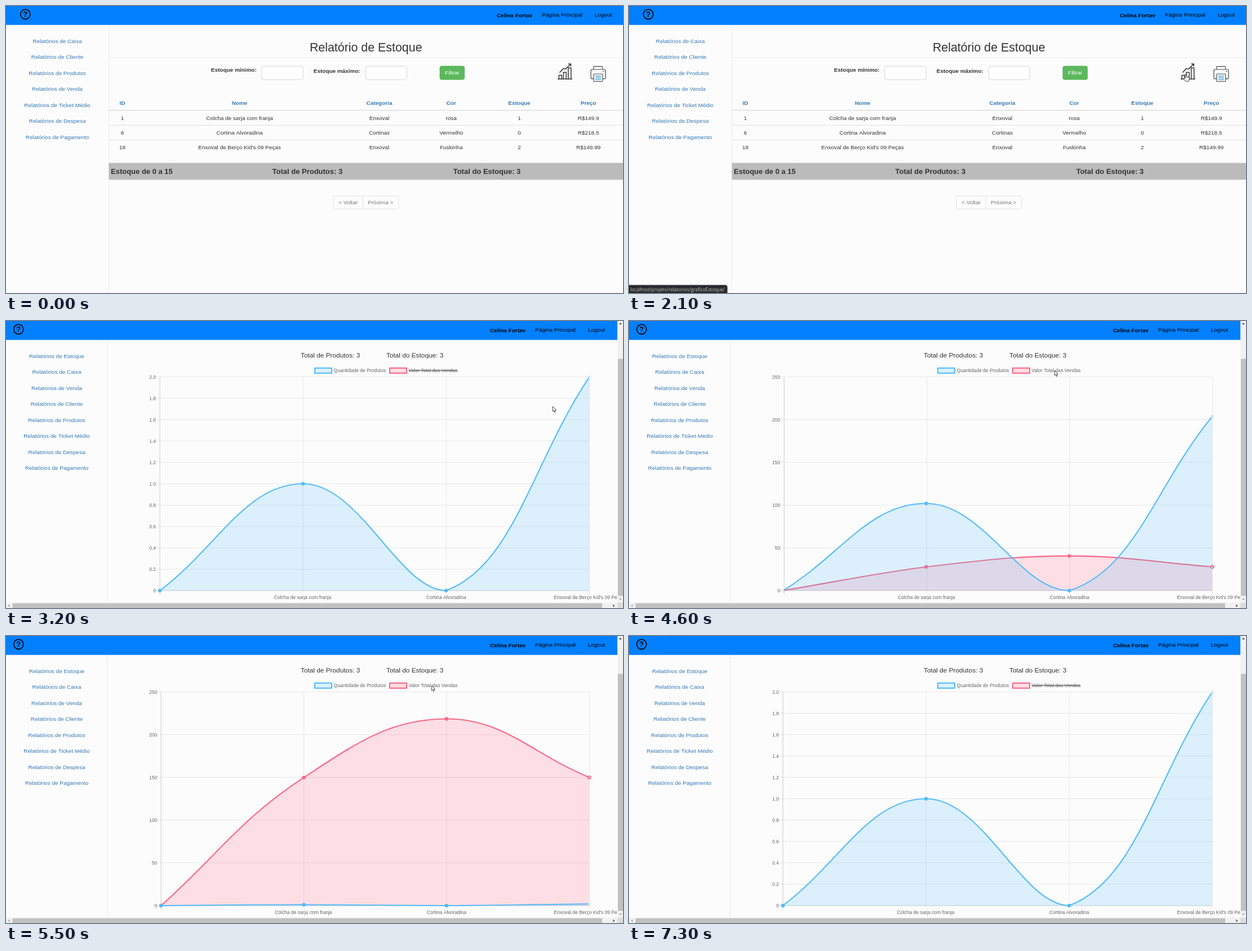
Animation of 1095x511 px, one loop 7.4 s. Source, as an HTML page with a canvas:

```html
<!DOCTYPE html>
<html lang="pt">
<head>
<meta charset="utf-8">
<title>Relatório de Estoque</title>
<style>
html, body { margin: 0; width: 100%; height: 100%; overflow: hidden; background: #fcfcfc; }
canvas { display: block; width: 1095px; height: 511px; }
</style>
</head>
<body>
<canvas id="stage"></canvas>
<script>
const W = 1095, H = 511, LOOP = 7400, STEP = 100;
const canvas = document.getElementById('stage');
const ctx = canvas.getContext('2d');
const dpr = window.devicePixelRatio || 1;
canvas.width = W * dpr;
canvas.height = H * dpr;

const SANS = '"Liberation Sans", Arial, sans-serif';
const USER = 'Celina Fortav';
const PRODUCTS = ['Colcha de sarja com franja', 'Cortina Alvoradina', "Enxoval de Berço Kid's 09 Peças"];
const LINK = '#337ab7', INK = '#333', BLUE = '#56bcf9', PINK = '#fa6687';
const BLUE_FILL = 'rgba(86,188,249,.2)', PINK_FILL = 'rgba(255,99,132,.2)';
const BASE = 9.98;

const clamp = (v, a = 0, b = 1) => Math.min(b, Math.max(a, v));
const lerp = (a, b, k) => a + (b - a) * k;
const easeOut = k => 1 - Math.pow(1 - clamp(k), 4);
const easeInOut = k => (1 - Math.cos(Math.PI * clamp(k))) / 2;

function text(str, x, y, { size = BASE, color = INK, align = 'left', bold = false, font = SANS } = {}) {
  ctx.font = `${bold ? 'bold ' : ''}${size}px ${font}`;
  ctx.textAlign = align;
  ctx.fillStyle = color;
  ctx.fillText(str, x, y);
}

function rect(x, y, w, h, color) {
  ctx.fillStyle = color;
  ctx.fillRect(x, y, w, h);
}

function box(x, y, w, h, r, fill, stroke, lw = 0.8) {
  ctx.beginPath();
  ctx.roundRect(x, y, w, h, r);
  if (fill) { ctx.fillStyle = fill; ctx.fill(); }
  if (stroke) { ctx.strokeStyle = stroke; ctx.lineWidth = lw; ctx.stroke(); }
}

function poly(pts, { fill, stroke, lw = 1, close = false } = {}) {
  ctx.beginPath();
  pts.forEach(([x, y]) => ctx.lineTo(x, y));
  if (close) ctx.closePath();
  if (fill) { ctx.fillStyle = fill; ctx.fill(); }
  if (stroke) { ctx.strokeStyle = stroke; ctx.lineWidth = lw; ctx.stroke(); }
}

function header(width, dx) {
  rect(0, 0, width, 33.7, '#0080ff');
  const x = 34.3 + dx;
  ctx.beginPath();
  ctx.arc(x, 14.8, 8.6, 0, 7);
  ctx.strokeStyle = '#000';
  ctx.lineWidth = 1.7;
  ctx.stroke();
  text('?', x, 19.4, { size: 13, bold: true, align: 'center', color: '#000' });
  text(USER, 902.5 + dx, 20, { bold: true, align: 'center', color: '#000' });
  text('Página Principal', 951 + dx, 19, { color: '#000' });
  text('Logout', 1044.7 + dx, 19, { color: '#000' });
}

function sidebar(names, cx, edge) {
  rect(0, 33.7, edge, H, '#fcfcfc');
  rect(edge, 33.7, 0.8, H, '#ebebeb');
  names.forEach((n, i) => text('Relatórios de ' + n, cx, 65.6 + i * 28.53, { color: LINK, align: 'center' }));
}

function chartIcon() {
  const o = { stroke: '#111', lw: 1.25 };
  poly([[979, 130], [1005, 130]], o);
  [[981.2, 123.3], [989.2, 118], [997.8, 110.2]].forEach(([x, y]) =>
    poly([[x, 130], [x, y], [x + 5, y], [x + 5, 130]], o));
  poly([[982.5, 118.5], [989, 111.5], [993, 112], [1002, 103.5]], o);
  poly([[997.8, 103], [1002.4, 103], [1002.4, 107.6]], o);
}

function printerIcon() {
  const c = '#444';
  box(1042.7, 107.6, 16, 8, 1, '#fcfcfc', c, 1.1);
  box(1038, 113, 26, 16.7, 2.5, '#fcfcfc', c, 1.2);
  rect(1059, 116, 2.4, 1.2, c);
  box(1043, 121, 15.8, 13.5, 1, '#fcfcfc', c, 1.1);
  [124, 127.3, 130.6].forEach(y => rect(1046, y, 10, 1.5, '#3fa3e0'));
}

function reportPage() {
  rect(0, 0, W, H, '#fcfcfc');
  sidebar(['Caixa', 'Cliente', 'Produtos', 'Venda', 'Ticket Médio', 'Despesa', 'Pagamento'], 91, 182);
  header(W, 0);
  text('Relatório de Estoque', 638.7, 81, { size: 21.38, align: 'center' });
  rect(183, 91.7, W, 0.8, '#e9e9e9');

  text('Estoque mínimo:', 363.8, 117, { bold: true });
  text('Estoque máximo:', 545.8, 118.6, { bold: true });
  box(453.8, 107.2, 73.4, 23.8, 3, '#fff', '#ccc');
  box(638.6, 107.2, 72.8, 23.8, 3, '#fff', '#ccc');
  box(770, 107, 43.6, 24, 3, '#5cb85c', '#4cae4c');
  text('Filtrar', 791.8, 122.3, { color: '#fff', align: 'center' });
  chartIcon();
  printerIcon();

  const cols = [206.5, 414.5, 662.5, 790.2, 911, 1033.6];
  const row = (cells, y, o) => cells.forEach((c, i) => text(c, cols[i], y, { align: 'center', ...o }));
  row(['ID', 'Nome', 'Categoria', 'Cor', 'Estoque', 'Preço'], 175.8, { bold: true, color: LINK });
  row(['1', PRODUCTS[0], 'Enxoval', 'rosa', '1', 'R$149.9'], 202.6);
  row(['6', PRODUCTS[1], 'Cortinas', 'Vermelho', '0', 'R$218.5'], 229);
  row(['18', PRODUCTS[2], 'Enxoval', 'Fuskinha', '2', 'R$149.99'], 255.3);
  rect(182, 185, W, 1.3, '#d9d9d9');
  [211.9, 238.2].forEach(y => rect(182, y, W, 0.8, '#d9d9d9'));

  rect(182.5, 279.4, W, 30, '#bbb');
  const big = { size: 13, bold: true };
  text('Estoque de 0 a 15', 186, 299, big);
  text('Total de Produtos: 3', 472.5, 299, big);
  text('Total do Estoque: 3', 793.7, 299, big);

  box(581, 338.3, 115.5, 23.2, 3, '#fdfdfd', '#ddd');
  rect(632.6, 338.3, 0.8, 23.2, '#ddd');
  text('< Voltar', 607.2, 353, { color: '#777', align: 'center' });
  text('Próxima >', 664.7, 353, { color: '#777', align: 'center' });
}

const RIGHT = 1035.3, TOP = 99.6, BOTTOM = 480;
const QTY = [0, 1, 0, 2], SALES = [0, 149.9, 218.5, 149.99], ZERO = [0, 0, 0, 0];

// Cardinal spline with tension 0.4, handles kept inside the plot.
function spline(vals, left, max) {
  const p = vals.map((v, i) => ({
    x: lerp(left, RIGHT, i / 3), y: lerp(BOTTOM, TOP, v / max)
  }));
  return p.map((c, i) => {
    const a = p[i - 1] || c, b = p[i + 1] || c;
    const d1 = Math.hypot(c.x - a.x, c.y - a.y), d2 = Math.hypot(b.x - c.x, b.y - c.y);
    const handle = f => [
      clamp(c.x + f * (b.x - a.x), left, RIGHT),
      clamp(c.y + f * (b.y - a.y), TOP, BOTTOM)
    ];
    const [px, py] = handle(-0.4 * d1 / (d1 + d2));
    const [nx, ny] = handle(0.4 * d2 / (d1 + d2));
    return { ...c, px, py, nx, ny };
  });
}

const blend = (a, b, k) => a.map((p, i) => {
  const q = {};
  for (const key in p) q[key] = lerp(p[key], b[i][key], k);
  return q;
});

function series(pts, left, color, fill, lastFill) {
  const trace = () => {
    ctx.beginPath();
    ctx.moveTo(pts[0].x, pts[0].y);
    for (let i = 1; i < 4; i++) {
      const a = pts[i - 1], b = pts[i];
      ctx.bezierCurveTo(a.nx, a.ny, b.px, b.py, b.x, b.y);
    }
  };
  ctx.save();
  ctx.beginPath();
  ctx.rect(left, TOP - 1, RIGHT - left, BOTTOM - TOP + 2);
  ctx.clip();
  trace();
  ctx.lineTo(pts[3].x, BOTTOM);
  ctx.lineTo(pts[0].x, BOTTOM);
  ctx.fillStyle = fill;
  ctx.fill();
  trace();
  ctx.strokeStyle = color;
  ctx.lineWidth = 2.14;
  ctx.stroke();
  ctx.restore();
  pts.forEach((p, i) => {
    if (p.x < left - 0.3) return;
    ctx.beginPath();
    ctx.arc(p.x, p.y, i < 3 ? 3.2 : 2.6, 0, 7);
    ctx.fillStyle = i < 3 ? color : lastFill;
    ctx.fill();
    if (i === 3 && color === PINK) {
      ctx.strokeStyle = color;
      ctx.lineWidth = 1.5;
      ctx.stroke();
    }
  });
}

function grid(left, max, step) {
  const line = (x, y, w, h, strong) => rect(x, y, w, h, strong ? 'rgba(0,0,0,.25)' : 'rgba(0,0,0,.1)');
  const n = Math.round(max / step);
  for (let i = 0; i <= n; i++) {
    const y = lerp(BOTTOM, TOP, i / n);
    line(left - 7, y - 0.4, RIGHT - left + 7, 0.8, i === 0);
    const label = i === 0 ? '0' : (i * step).toFixed(step < 1 ? 1 : 0);
    text(label, left - 7, y + 3, { size: 8.56, color: '#666', align: 'right' });
  }
  for (let i = 0; i < 4; i++) {
    const x = lerp(left, RIGHT, i / 3);
    line(x - 0.4, TOP, 0.8, BOTTOM - TOP + 7, i === 0);
    if (i) text(PRODUCTS[i - 1], x - (i === 1 ? 0.8 : 0), 494.5, { size: 8.56, color: '#666', align: 'center' });
  }
}

function legend(x, label, color, fill, hidden) {
  rect(x, 83.8, 30, 9, fill);
  ctx.strokeStyle = color;
  ctx.lineWidth = 2.1;
  ctx.strokeRect(x, 83.8, 30, 9);
  text(label, x + 33.5, 91, { size: 8.56, color: '#666' });
  if (hidden) rect(x + 33.5, 87.6, ctx.measureText(label).width, 1.4, '#666');
}

function chart(t) {
  const both = t >= 4600 && t < 5900;
  const left = both ? 275.2 : 273.1, max = both ? 250 : 2;
  legend(548, 'Quantidade de Produtos', BLUE, BLUE_FILL, false);
  legend(681, 'Valor Total das Vendas', PINK, PINK_FILL, !both);
  grid(left, max, both ? 50 : 0.2);

  const small = spline(QTY, 275.2, 250), full = spline(QTY, 273.1, 2);
  let blue;
  if (t < 4600) {
    const k = t < 2600 ? 0 : easeOut((t - 2120) / 1000);
    blue = blend(spline(ZERO, 273.1, 2), full, k);
  } else if (both) {
    const k = easeOut((t - 4550) / 1000);
    const pink = blend(spline(ZERO, 273.1, 250), spline(SALES, 275.2, 250), k);
    series(pink, left, PINK, PINK_FILL, '#fcb3c3');
    blue = blend(full, small, k);
  } else {
    blue = blend(small, full, easeOut((t - 5800) / 1000));
  }
  series(blue, left, BLUE, BLUE_FILL, '#cfe9fa');
}

function scrollbars(k) {
  rect(1085, 0, 10, 501.5, '#f1f1f1');
  rect(0, 501.5, 1085, 9.5, '#f1f1f1');
  rect(1085, 501.5, 10, 9.5, '#dcdcdc');
  rect(1086, 10 + 57.3 * k, 9, 422, '#c1c1c1');
  rect(11.5, 502.5, 1046.5, 8.5, '#c1c1c1');
  const tri = (x, y, dx, dy, on) => poly(
    [[x + dx * 2, y + dy * 2], [x - dx + dy * 2.6, y - dy + dx * 2.6], [x - dx - dy * 2.6, y - dy - dx * 2.6]],
    { fill: on ? '#505050' : '#a3a3a3', close: true });
  tri(1090.4, 5, 0, -1, k > 0);
  tri(1090.4, 495, 0, 1, k < 1);
  tri(5.5, 507, -1, 0, false);
  tri(1078.5, 507, 1, 0, true);
}

function graphPage(t) {
  const k = easeInOut((t - 2850) / 350);
  const off = 68.5 * (1 - k);
  rect(0, 0, W, H, '#fcfcfc');
  ctx.save();
  ctx.beginPath();
  ctx.rect(0, 0, 1085, 501.5);
  ctx.clip();
  ctx.translate(0, off);
  text('Gráfico de Estoque', 631.7, 12.5, { size: 21.38, align: 'center' });
  rect(180, 23.2, 905, 0.8, '#e5e5e5');
  text('Total de Produtos: 3', 523, 65, { size: 11.83 });
  text('Total do Estoque: 3', 675, 65, { size: 11.83 });
  if (t >= 2400) chart(t);
  ctx.restore();
  sidebar(['Estoque', 'Caixa', 'Venda', 'Cliente', 'Produtos', 'Ticket Médio', 'Despesa', 'Pagamento'], 90, 179.4);
  header(1085, -12);
  scrollbars(k);
  if (t < 2700) {
    rect(0, 497, 180, 4.5, 'rgba(0,0,0,.1)');
    rect(11.5, 502.5, 352, 8.5, 'rgba(0,0,0,.1)');
  }
}

function statusBubble(alpha) {
  ctx.globalAlpha = alpha;
  box(-4, 497, 178.3, 18, 3, '#2a2b2d', '#444');
  text('localhost/projeto/relatorios/graficoEstoque/', 2.5, 507.6,
    { size: 8.2, color: '#c4c6c8', font: '"Open Sans", "Noto Sans", sans-serif' });
  ctx.globalAlpha = 1;
}

// Pointer stops: time, x, y.
const PATH = [
  [200, 51, 3], [400, 290, 110], [600, 640, 205], [700, 830, 218], [800, 970, 205], [900, 1021, 172],
  [1100, 1008, 142], [1300, 992, 126], [1500, 988, 121], [2100, 988, 121], [2400, 970, 152],
  [3300, 970, 152], [3500, 915, 136], [3700, 815, 104], [3900, 755, 88], [6600, 755, 88],
  [6800, 610, 84], [7000, 360, 70], [7200, 120, 40], [7300, 72, -9]
];

function pointer(t) {
  if (t < PATH[0][0]) return;
  const i = Math.max(1, PATH.findIndex(p => p[0] >= t));
  const [t0, x0, y0] = PATH[i - 1], [t1, x1, y1] = PATH[i];
  const k = (t - t0) / (t1 - t0);
  ctx.save();
  ctx.translate(lerp(x0, x1, k), lerp(y0, y1, k));
  ctx.lineJoin = 'round';
  const skin = { fill: '#fff', stroke: '#222', lw: 0.85, close: true };
  if (t >= 1300 && t < 2200) {
    poly([[-1, 0.8], [0, 0], [1, 0.8], [1, 4.4], [4.6, 5.2], [6.2, 6.4], [6.2, 9.4], [5, 13],
      [-0.4, 13], [-3.4, 8.6], [-3.6, 7], [-2.4, 6.8], [-1, 8.2]], skin);
    [2, 3.8].forEach(x => poly([[x, 5.2], [x, 7.2]], { stroke: '#222', lw: 0.6 }));
  } else {
    poly([[0.3, 0.2], [0.3, 9], [2.3, 7.3], [3.7, 10.5], [5.1, 9.9], [3.8, 6.8], [6.5, 6.6]], skin);
  }
  ctx.restore();
}

function draw(now) {
  const t = Math.floor((now % LOOP) / STEP) * STEP;
  ctx.setTransform(dpr, 0, 0, dpr, 0, 0);
  if (t < 2200) {
    reportPage();
    if (t >= 1300) statusBubble(clamp((t - 1200) / 300));
  } else {
    graphPage(t);
  }
  pointer(t);
}

let start = null;
function tick(now) {
  if (start === null) start = now;
  draw(now - start);
  requestAnimationFrame(tick);
}
draw(0);
requestAnimationFrame(tick);
</script>
</body>
</html>
```
